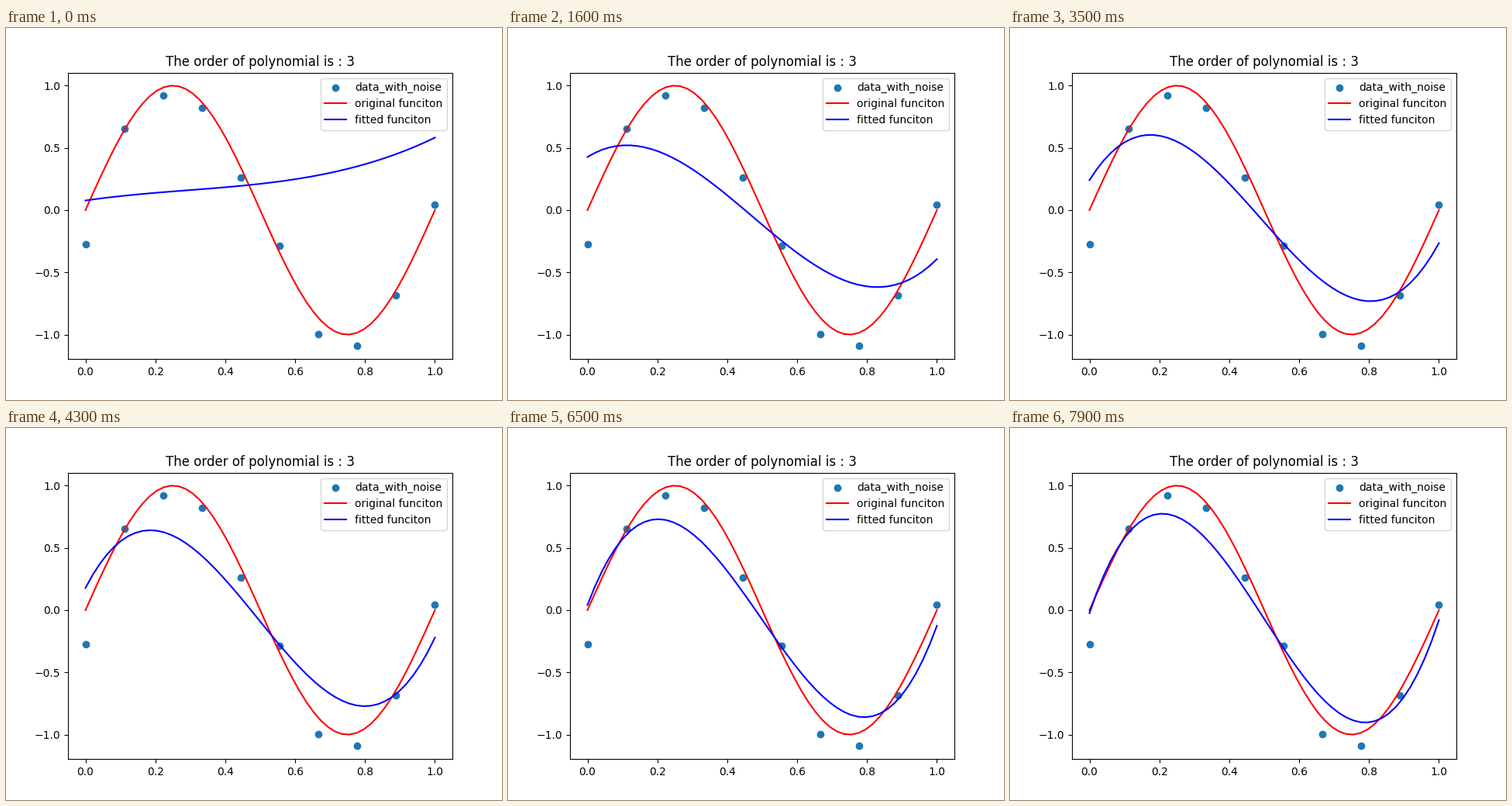
Recreate the animation shown at these times as a matplotlib script. Size 640 px wide and 480 px high, loop 8 s.

```python
import numpy as np
import matplotlib.pyplot as plt
from matplotlib.animation import FuncAnimation

ORDER = 3
FRAMES, INTERVAL = 80, 100
RATE, STEPS = 0.1, 100  # gradient descent step size, steps per frame

# Noisy samples of one sine period
x = np.linspace(0, 1, 10)
y = np.array([-0.274, 0.654, 0.922, 0.822, 0.262,
              -0.287, -0.997, -1.0915, -0.685, 0.044])

# Least-squares descent in closed form: the error shrinks by a fixed matrix
A = np.vander(x, ORDER + 1, increasing=True)
w_best = np.linalg.lstsq(A, y, rcond=None)[0]
w_start = np.array([0.077, 0.411, -0.665, 0.759])
shrink = np.linalg.matrix_power(np.eye(ORDER + 1) - RATE * A.T @ A, STEPS)

xs = np.linspace(0, 1, 50)
basis = np.vander(xs, ORDER + 1, increasing=True)


def fitted(n):
    error = np.linalg.matrix_power(shrink, n) @ (w_start - w_best)
    return basis @ (w_best + error)


fig, ax = plt.subplots(figsize=(6.4, 4.8), dpi=100)
ax.scatter(x, y, label="data_with_noise")
ax.plot(xs, np.sin(2 * np.pi * xs), "r", label="original funciton")
curve, = ax.plot(xs, fitted(0), "b", label="fitted funciton")
ax.set_xlim(-0.05, 1.05)
ax.set_ylim(-1.1966, 1.1041)
ax.set_title(f"The order of polynomial is : {ORDER}")
ax.legend(loc="upper right")


def update(n):
    curve.set_ydata(fitted(n))
    return curve,


anim = FuncAnimation(fig, update, frames=FRAMES, interval=INTERVAL,
                     repeat=True, repeat_delay=0)
plt.show()
```
